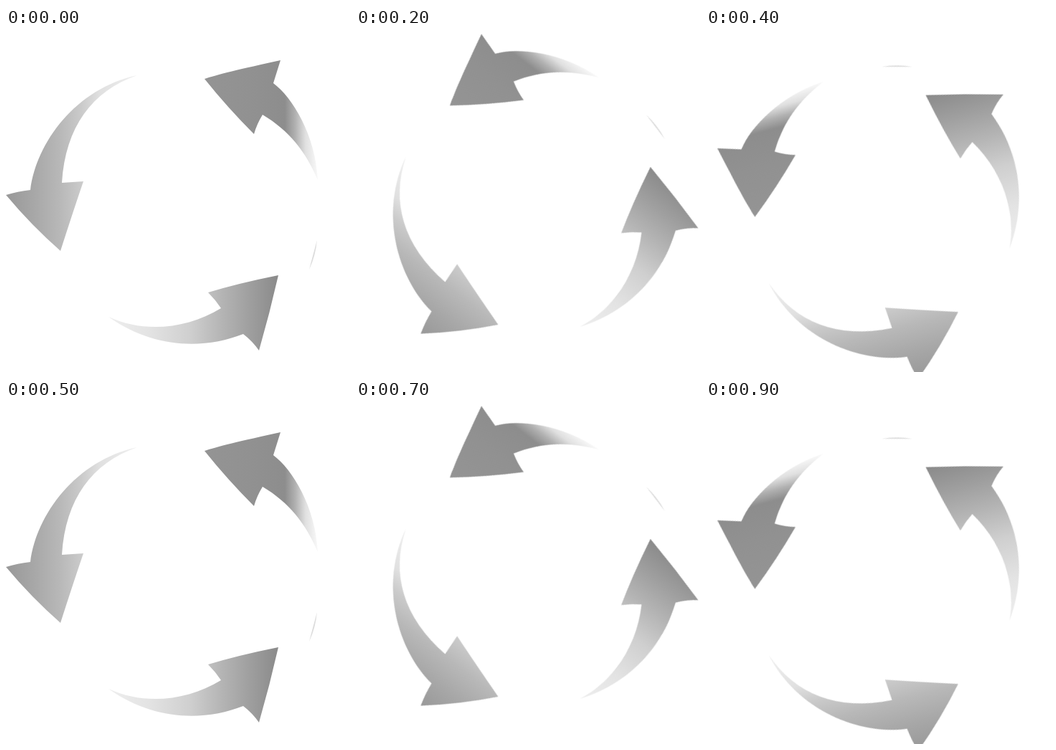
An HTML page that plays this animation: 480x480 px, repeating every 1000 ms.

```html
<!DOCTYPE html>
<html lang="en">
<head>
<meta charset="utf-8">
<title>Rotating arrows</title>
<style>
  html, body { margin: 0; width: 100%; height: 100%; overflow: hidden; background: #fff; }
  svg { display: block; width: 100%; height: 100%; }
  .ring {
    transform-origin: 244.3px 242.3px;
    animation: turn 500ms step-end infinite;
  }
  /* Five held poses; the ring wobbles a little as it turns. */
  @keyframes turn {
    0%   { transform: none; }
    20%  { transform: translate(3.7px, -3px) rotate(-26.2deg); }
    40%  { transform: translate(2.4px, -3.6px) rotate(-52.4deg); }
    60%  { transform: translate(0.4px, 0.4px) rotate(-78.6deg); }
    80%  { transform: translate(-2.1px, 8.9px) rotate(-104.9deg); }
    100% { transform: none; }
  }
</style>
</head>
<body>
<svg viewBox="0 0 480 480">
  <defs>
    <linearGradient id="dark" gradientUnits="userSpaceOnUse" x1="277" y1="0" x2="437" y2="0">
      <stop offset="0" stop-color="#949494"/>
      <stop offset=".4" stop-color="#919191"/>
      <stop offset=".7" stop-color="#8d8d8d"/>
      <stop offset=".79" stop-color="#b0b0b0"/>
      <stop offset=".88" stop-color="#e0e0e0"/>
      <stop offset="1" stop-color="#fcfcfc"/>
    </linearGradient>
    <linearGradient id="light" gradientUnits="userSpaceOnUse" x1="0" y1="0" x2="184" y2="0">
      <stop offset="0" stop-color="#989898"/>
      <stop offset=".22" stop-color="#a8a8a8"/>
      <stop offset=".41" stop-color="#b8b8b8"/>
      <stop offset=".57" stop-color="#cacaca"/>
      <stop offset=".71" stop-color="#e0e0e0"/>
      <stop offset="1" stop-color="#f0f0f0"/>
    </linearGradient>
    <linearGradient id="mid" gradientUnits="userSpaceOnUse" x1="143" y1="0" x2="380" y2="0">
      <stop offset="0" stop-color="#eeeeee"/>
      <stop offset=".24" stop-color="#e3e3e3"/>
      <stop offset=".48" stop-color="#cfcfcf"/>
      <stop offset=".67" stop-color="#b4b4b4"/>
      <stop offset=".83" stop-color="#9f9f9f"/>
      <stop offset="1" stop-color="#8a8a8a"/>
    </linearGradient>
  </defs>
  <g class="ring">
    <path fill="url(#dark)" d="M277 71 Q300 63 383 45 L373 77 C400 97 432 150 435 212 C418 172 395 143 358 121 Q350 134 346 148 Q309 111 277 71 Z"/>
    <path fill="url(#light)" d="M76 311 Q35 275 0 233 Q16 228 34 226 C42 160 98 84 183 66 C120 88 83 138 78 216 L108 214 Q94 255 76 311 Z"/>
    <path fill="url(#mid)" d="M380 345 Q368 398 353 450 Q344 437 331 427 C275 449 205 447 143 403 C193 426 252 420 300 391 Q292 379 282 369 Q325 356 380 345 Z"/>
    <path fill="#dcdcdc" d="M434 296 Q432 318 423 337 Q428 318 434 296 Z"/>
  </g>
</svg>
</body>
</html>
```
